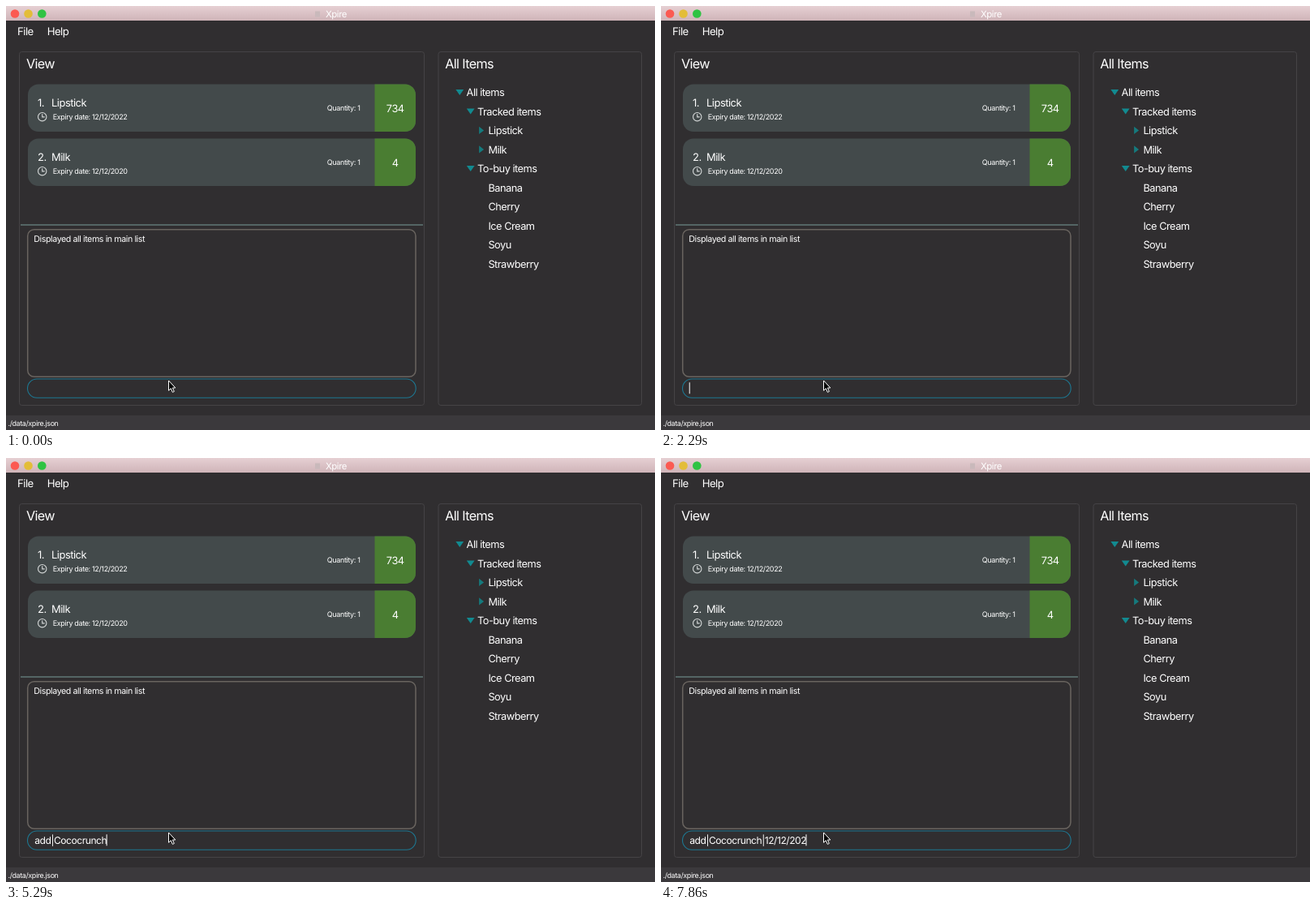
An HTML page that plays this animation: 800x523 px, repeating every 8 s.

```html
<!DOCTYPE html>
<html lang="en">
<head>
<meta charset="utf-8">
<title>Xpire</title>
<style>
  html, body { margin: 0; width: 100%; height: 100%; overflow: hidden; background: #302e30; }
  svg { display: block; width: 100vw; height: 100vh; }
  text {
    font-family: Inter, Roboto, "Liberation Sans", sans-serif;
    letter-spacing: -.04em;
    font-feature-settings: "calt" 0;
    text-rendering: geometricPrecision;
    white-space: pre;
    fill: #fff;
  }
  .panel { fill: none; stroke: #454346; }
</style>
</head>
<body>
<svg id="stage" viewBox="0 0 800 523" preserveAspectRatio="none">
  <defs>
    <linearGradient id="bar" x2="0" y2="1">
      <stop offset="0" stop-color="#e6d0d3"/>
      <stop offset="1" stop-color="#cfb4b8"/>
    </linearGradient>
  </defs>
  <rect width="800" height="523" fill="#302e30"/>
  <rect width="800" height="18" fill="url(#bar)"/>
  <circle cx="11" cy="9.5" r="5.3" fill="#fb5a52"/>
  <circle cx="27.5" cy="9.5" r="5.3" fill="#e3bd38"/>
  <circle cx="44.3" cy="9.5" r="5.3" fill="#2fc343"/>
  <rect x="381" y="6.5" width="6" height="7" fill="#c9b9bb"/>

  <rect class="panel" x="16.5" y="56.5" width="499" height="436" rx="3"/>
  <rect class="panel" x="533" y="56.5" width="250.5" height="436" rx="3"/>
  <rect y="505" width="800" height="18" fill="#3b393c"/>
  <path d="M18 270H514" stroke="#607776" stroke-width="1.6"/>
  <rect x="26.7" y="275.7" width="478.3" height="181.6" rx="8" fill="none" stroke="#69645f" stroke-width="1.5"/>
  <rect x="26.5" y="460" width="478.7" height="23.3" rx="11.6" fill="none" stroke="#1d7791" stroke-width="1.1"/>

  <g id="ui"></g>

  <text id="cmd" x="35.3" y="475.7" font-size="12.1"></text>
  <rect id="caret" y="464.3" width="1" height="14" fill="#fff"/>
  <path d="M200.5 462V474.3L203.3 471.7L205.3 476.4L207.3 475.5L205.4 471H208.8Z"
        fill="#000" stroke="#fff" stroke-width="1" stroke-linejoin="round"/>
</svg>
<script>
const $ = id => document.getElementById(id);
const ui = $("ui"), cmd = $("cmd"), caret = $("caret");

function add(tag, attrs, body = "") {
  const el = document.createElementNS("http://www.w3.org/2000/svg", tag);
  for (const key in attrs) el.setAttribute(key, attrs[key]);
  el.textContent = body;
  return ui.appendChild(el);
}

// Text centred vertically on cy.
const label = (x, cy, size, body, style = {}) =>
  add("text", { x, y: cy + size * .36, "font-size": size, ...style }, body);

function card(y, no, name, date, days) {
  add("rect", { x: 27, y, width: 478, height: 58.5, rx: 13, fill: "#434a4b" });
  add("path", { d: `M454.5 ${y}H492a13 13 0 0 1 13 13v32.5a13 13 0 0 1 -13 13H454.5Z`, fill: "#4a7d32" });
  const soft = { fill: "#e8e9e9" };
  label(39, y + 22.8, 13, no + ".", soft);
  label(56, y + 22.8, 13, name, soft);
  label(57.7, y + 40, 9.03, "Expiry date: " + date, soft);
  label(395.8, y + 29.2, 9, "Quantity: 1", soft);
  label(479.7, y + 29.5, 12.8, days, { ...soft, "text-anchor": "middle" });
  const pen = { fill: "none", stroke: "#d5d8d8", "stroke-width": 1.1 };
  add("circle", { cx: 44.7, cy: y + 40.2, r: 5.2, ...pen });
  add("path", { d: `M44.7 ${y + 36.8}v3.6h3`, ...pen });
}

label(394, 9.7, 11.4, "Xpire", { fill: "#3a3032" });
label(14, 31.5, 13.2, "File");
label(50.7, 31.5, 13.2, "Help");
label(25, 71.6, 16.2, "View");
label(541.3, 71.6, 16.2, "All Items");
label(34.3, 287, 10.7, "Displayed all items in main list");
label(2.5, 514.8, 8.9, "./data/xpire.json");
card(96.5, 1, "Lipstick", "12/12/2022", 734);
card(163.5, 2, "Milk", "12/12/2020", 4);

// Tree rows: depth, marker (v open, > closed), name.
[
  [0, "v", "All items"],
  [1, "v", "Tracked items"],
  [2, ">", "Lipstick"],
  [2, ">", "Milk"],
  [1, "v", "To-buy items"],
  ...["Banana", "Cherry", "Ice Cream", "Soyu", "Strawberry"].map(name => [2, "", name])
].forEach(([depth, mark, name], i) => {
  const x = 567.6 + depth * 13.4, y = 106.7 + i * 23.5;
  label(x, y, 12.8, name);
  if (mark === "v") add("path", { d: `M${x - 13.2} ${y - 3.7}h9.8l-4.9 7z`, fill: "#128a90" });
  if (mark === ">") add("path", { d: `M${x - 11.3} ${y - 5}v9.4l6 -4.7z`, fill: "#157a7d" });
});

const LOOP = 8000;
const line = "add|Cococrunch|12/12/202";
const keys = [
  2860, 3000, 3140, 3570, 3860, 4000, 4140, 4290,
  4430, 4570, 4860, 5000, 5140, 5290,
  6290, 6570, 6710, 6860,
  7000, 7140, 7290, 7570, 7710, 7860
];
const caretOff = [[0, 290], [860, 1290], [1860, 2290], [5860, 6290]];

let shown = -1;
function frame(now) {
  const t = now % LOOP;
  const count = keys.filter(k => k <= t).length;
  if (count !== shown) {
    shown = count;
    cmd.textContent = line.slice(0, count);
    const width = count ? cmd.getComputedTextLength() : 0;
    caret.setAttribute("x", 34.7 + width);
  }
  const off = caretOff.some(([from, to]) => t >= from && t < to);
  caret.setAttribute("visibility", off ? "hidden" : "visible");
}

const start = performance.now();
function tick() {
  frame(performance.now() - start);
  requestAnimationFrame(tick);
}
tick();
</script>
</body>
</html>
```
